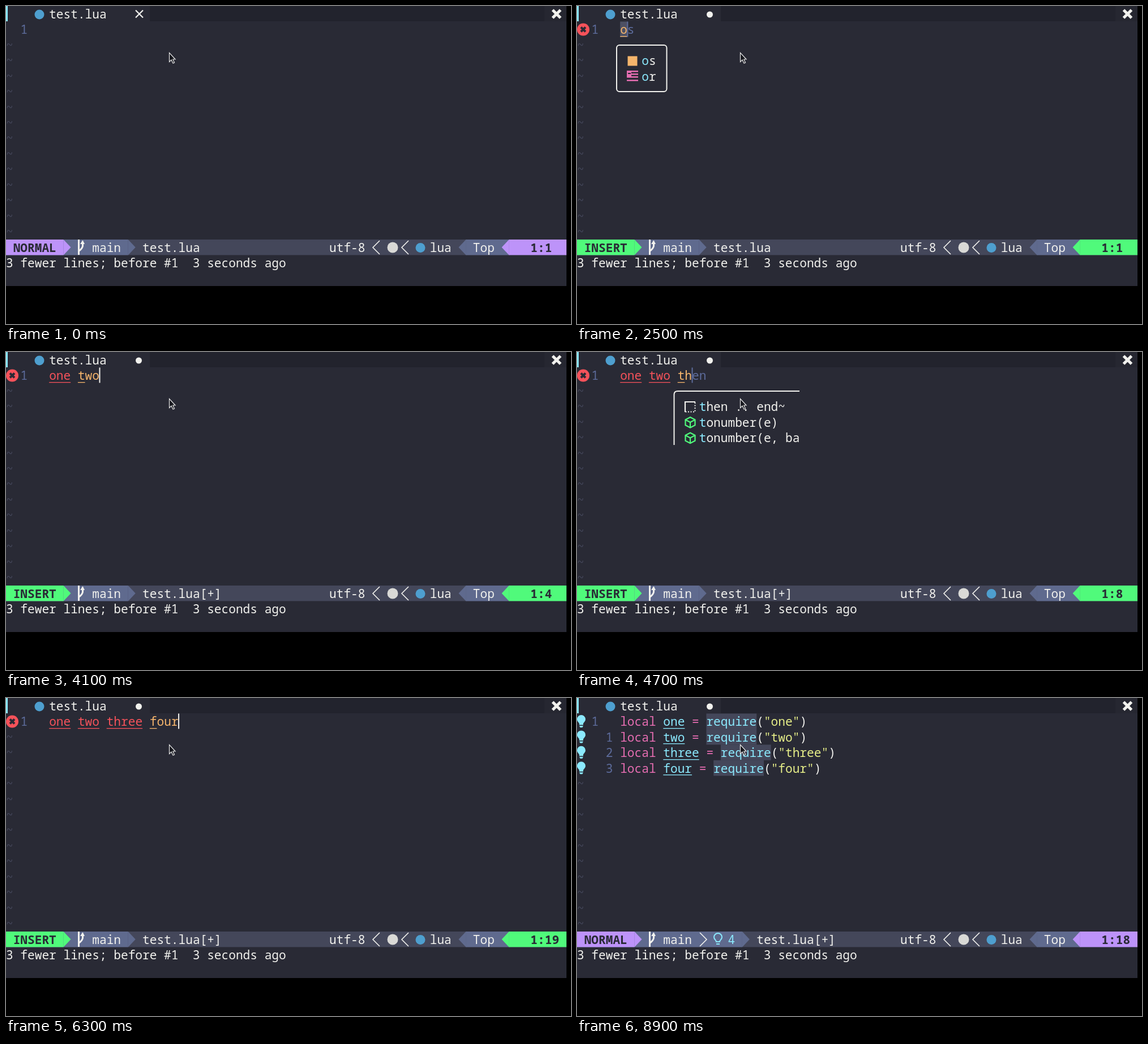
These frames come from a looping animation (998 px wide and 561 px high, 9 s). An HTML page with a canvas:

```html
<!DOCTYPE html>
<html lang="en">
<head>
<meta charset="utf-8">
<title>Editor session</title>
<style>
  html, body { margin: 0; width: 100%; height: 100%; overflow: hidden; background: #000; }
  canvas { display: block; }
</style>
</head>
<body>
<canvas id="stage" width="998" height="561"></canvas>
<script>
const ctx = document.getElementById('stage').getContext('2d');
const LOOP = 9000, CELL = 12.69, ROW = 27.45;
const BG = '#292a35', FG = '#f2f2ee', GREY = '#44475a', BLUE = '#5d6c9c', SLATE = '#5f6a8e',
  PURPLE = '#bd93f9', GREEN = '#50fa7b', CYAN = '#8be9fd', PINK = '#e56db1',
  ORANGE = '#f5b56c', RED = '#f5525a', YELLOW = '#e6ee88', DOT = '#4e9fcf', MARK = '#4d5063';

const TYPED = 'one two three four';
const WORDS = TYPED.split(' ');
const KEYS = [[2400, 1], [3700, 5], [4700, 10], [5500, 15], [6000, 18]]; // time, letters typed
const INSERT_AT = 1900, NORMAL_AT = 6600, EXPAND_AT = 8500;

function typedCount(t) {
  if (t < KEYS[0][0]) return 0;
  for (let i = 1; i < KEYS.length; i++) {
    const [t0, n0] = KEYS[i - 1], [t1, n1] = KEYS[i];
    if (t < t1) return Math.floor(n0 + (n1 - n0) * (t - t0) / (t1 - t0) + 1e-6);
  }
  return TYPED.length;
}

const colX = col => col * CELL;
const rowMid = row => 14 + row * ROW;

function rect(x, y, w, h, color) {
  ctx.fillStyle = color;
  ctx.fillRect(x, y, w, h);
}

function text(str, col, row, color = FG, bold = false) {
  ctx.font = `${bold ? 'bold ' : ''}21.15px "Noto Sans Mono", "DejaVu Sans Mono", monospace`;
  ctx.fillStyle = color;
  ctx.fillText(str, colX(col), 21.8 + row * ROW);
}

function underline(col, row, n, color) {
  rect(colX(col), Math.floor(26 + row * ROW), n * CELL, 1.3, color);
}

function shade(col, row, n, color) {
  rect(colX(col), row * ROW, n * CELL, ROW, color);
}

function disc(x, y, r, color) {
  ctx.fillStyle = color;
  ctx.beginPath();
  ctx.arc(x, y, r, 0, 7);
  ctx.fill();
}

function stroke(d, color, width, x = 0, y = 0) {
  ctx.save();
  ctx.translate(x, y);
  ctx.strokeStyle = color;
  ctx.lineWidth = width;
  ctx.stroke(new Path2D(d));
  ctx.restore();
}

function fill(d, color, x = 0, y = 0) {
  ctx.save();
  ctx.translate(x, y);
  ctx.fillStyle = color;
  ctx.fill(new Path2D(d));
  ctx.restore();
}

function cross(x, y, r, color, width) {
  stroke(`M${-r} ${-r}L${r} ${r}M${r} ${-r}L${-r} ${r}`, color, width, x, y);
}

function errorSign(row) {
  disc(11, rowMid(row), 11, RED);
  cross(11, rowMid(row), 4, BG, 4);
}

function hintSign(row) {
  const y = rowMid(row);
  fill('M-3.5 4C-3.5 2 -7.5 0 -7.5 -4A7.5 7.5 0 0 1 7.5 -4C7.5 0 3.5 2 3.5 4V6H-3.5ZM-3.5 7.5H3.5L2 10.5H-2Z',
    CYAN, 7.5, y);
}

function cube(x, y) {
  stroke('M0 -9L8.5 -4.5V5L0 9.5L-8.5 5V-4.5ZM-8.5 -4.5L0 0L8.5 -4.5M0 0V9.5', GREEN, 2.2, x, y);
}

function popupShort() {
  ctx.strokeStyle = FG;
  ctx.lineWidth = 2;
  ctx.beginPath();
  ctx.roundRect(70, 69, 88.5, 82, 5);
  ctx.stroke();
  rect(89.5, 88.5, 17, 17, ORANGE);
  for (const y of [114, 119, 124, 130]) rect(88, y, 20, 2.5, PINK);
  rect(88, 114, 8, 12, PINK);
  rect(90, 118, 5, 2, BG);
  ['s', 'r'].forEach((c, i) => {
    text('o', 9, 3 + i, CYAN);
    text(c, 10, 3 + i);
  });
}

function popupLong() {
  stroke('M171.5 164V75Q171.5 69 178 69H393', FG, 2);
  stroke('M191 106V88H209', FG, 2.2);
  ctx.setLineDash([2, 2.5]);
  stroke('M208.5 89V105.5H191', FG, 2);
  ctx.setLineDash([]);
  cube(200, 124);
  cube(200, 151.5);
  ['hen .. end~', 'onumber(e)', 'onumber(e, ba'].forEach((s, i) => {
    text('t', 17, 3 + i, CYAN);
    text(s, 18, 3 + i);
  });
}

function drawTyped(n, insert) {
  let col = 6;
  const parts = TYPED.slice(0, n).split(' ');
  parts.forEach((word, i) => {
    const current = i === parts.length - 1, color = current ? ORANGE : RED;
    if (word) {
      // the marker covers a fresh letter, then the whole word once typing stops
      if (current && (!insert || word.length === 1)) shade(col, 1, word.length, MARK);
      text(word, col, 1, color);
      underline(col, 1, current && insert ? 1 : word.length, color);
    }
    col += word.length + 1;
  });
  if (n === 1) text('s', 7, 1, BLUE);
  if (n === 10) text('en', 16, 1, BLUE);
  if (insert) rect(colX(6 + n) - 0.5, ROW, 2, ROW - 0.5, n === 1 || n === 10 ? BLUE : FG);
  else if (n) {
    shade(5 + n, 1, 1, ORANGE);
    text(TYPED[n - 1], 5 + n, 1, BG);
    underline(5 + n, 1, 1, '#8a6b4c');
  }
}

function drawExpanded() {
  WORDS.forEach((word, i) => {
    const row = i + 1, eq = 13 + word.length;
    hintSign(row);
    if (i) text(String(i), 4, row, BLUE);
    text('local', 6, row, PINK);
    text(word, 12, row, CYAN);
    underline(12, row, word.length, CYAN);
    text('=', eq, row, PINK);
    shade(eq + 2, row, 7, GREY);
    text('require', eq + 2, row, CYAN);
    text('(', eq + 9, row);
    text(`"${word}"`, eq + 10, row, YELLOW);
    text(')', eq + 12 + word.length, row);
  });
}

function drawTabs(modified) {
  rect(254, 0, 697, 27, '#22232d');
  rect(951, 0, 39, 27, '#262731');
  rect(0, 0, 3, 27, CYAN);
  disc(59, 15, 8.5, DOT);
  text('test.lua', 6, 0);
  if (modified) disc(234.5, 15, 5.5, FG);
  else cross(235.5, 14, 6.5, FG, 2.2);
  cross(972.5, 14, 7, FG, 5);
}

function drawStatus(t, insert, expanded) {
  const y = 412, h = 27.4, mid = y + h / 2, mode = insert ? GREEN : PURPLE;
  const seen = typedCount(Math.floor((t - 150) / 1000) * 1000 + 150); // refreshed once a second
  const after = t >= NORMAL_AT;
  const end = expanded ? 23 : after ? 27 : 17;
  const right = (col, color) => fill(`M0 ${y}L13 ${mid}L0 ${y + h}Z`, color, colX(col));
  const left = (col, color) => fill(`M13 ${y}L0 ${mid}L13 ${y + h}Z`, color, colX(col));

  rect(0, y, 990, h, GREY);
  rect(0, y, colX(end), h, SLATE);
  right(end, SLATE);
  rect(0, y, colX(8), h, mode);
  right(8, mode);
  text(insert ? 'INSERT' : 'NORMAL', 1, 15, BG, true);

  stroke('M128.5 412V439M135.5 419V423Q135.5 427 129 432', FG, 3);
  fill('M131 420L135.5 413L139 420Z', FG);
  text('main', 12, 15);

  if (after) {
    stroke('M217 414L229 426L217 438', FG, 1.6);
    if (expanded) {
      stroke('M-3 5C-3 2 -7 1 -7 -3A7 7 0 0 1 7 -3C7 1 3 2 3 5ZM-3 9H3', CYAN, 2, 249, 425);
      text('4', 21, 15, CYAN);
    } else {
      stroke('M10 0A10 10 0 1 1 -10 0A10 10 0 1 1 10 0', RED, 1.8, 252, 426);
      cross(252, 426, 3.8, RED, 1.8);
      text('4', 21, 15, RED);
      stroke('M0 -9L10.5 9H-10.5ZM0 -3V3M0 5V7', ORANGE, 2, 303.5, 427);
      text('4', 25, 15, ORANGE);
    }
  }
  text('test.lua' + (seen ? '[+]' : ''), end + 2, 15);

  text('utf-8', 45, 15);
  stroke('M660 414L648 426L660 438M711 414L699 426L711 438', FG, 1.6);
  disc(683, 426, 9.5, '#d9d9d6');
  disc(732, 426.5, 8.5, DOT);
  text('lua', 59, 15);
  left(63, SLATE);
  rect(colX(64), y, colX(6), h, SLATE);
  text('Top', 65, 15);
  left(69, mode);
  rect(colX(70), y, 990 - colX(70), h, mode);
  text('1:' + (after ? TYPED.length : seen + 1), 73, 15, BG, true);
}

function drawPointer() {
  const d = 'M288.5 82.5V98.5L292 95L295 101L297.5 100L294.8 94H299Z';
  fill(d, '#15161c');
  stroke(d, '#e8e8e8', 1.2);
}

function draw(t) {
  const n = typedCount(t), expanded = t >= EXPAND_AT;
  const insert = t >= INSERT_AT && t < NORMAL_AT;

  rect(0, 0, 998, 561, '#000');
  rect(0, 0, 990, 494, BG);
  drawTabs(n > 0);
  text('1', 2, 1, BLUE);
  for (let row = expanded ? 5 : 2; row < 15; row++) text('~', 0, row, GREY);

  if (expanded) drawExpanded();
  else {
    if (n) errorSign(1);
    drawTyped(n, insert);
    if (n === 1) popupShort();
    if (n === 10) popupLong();
  }
  drawStatus(t, insert, expanded);
  text('3 fewer lines; before #1  3 seconds ago', 0, 16);
  drawPointer();
}

const start = performance.now();
function tick() {
  draw((performance.now() - start) % LOOP);
  requestAnimationFrame(tick);
}
tick();
</script>
</body>
</html>
```
